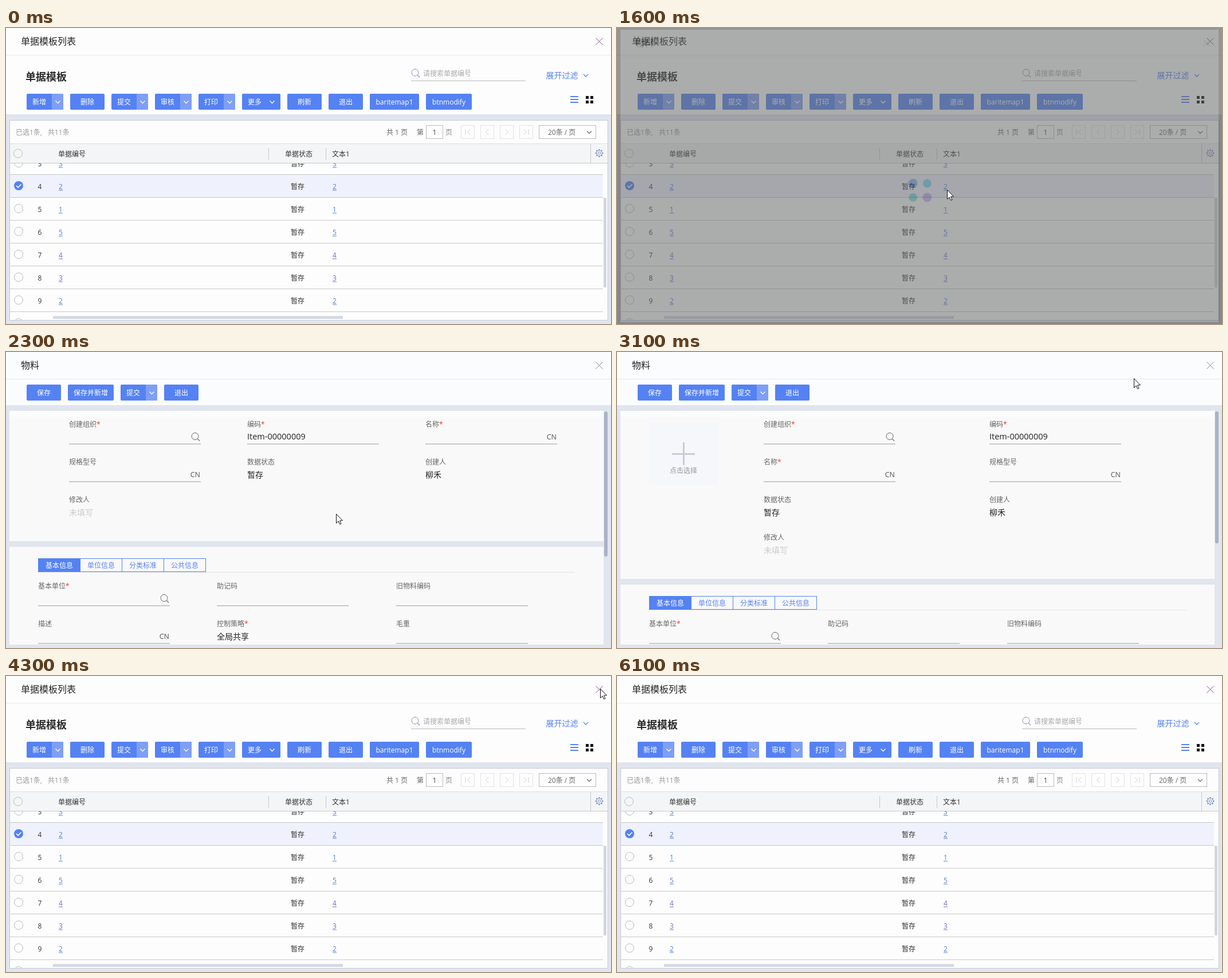
Write an HTML page with a canvas that moves like this. It is 1056 px wide and 518 px high and loops after 6400 ms.

```html
<!DOCTYPE html>
<html lang="zh-CN">
<head>
<meta charset="utf-8">
<style>
html, body { margin: 0; width: 100%; height: 100%; overflow: hidden; background: #fff; }
canvas { display: block; }
</style>
</head>
<body>
<canvas id="stage" width="1056" height="518"></canvas>
<script>
const W = 1056, H = 518, LOOP = 6400;
const FONT = '"Open Sans","Noto Sans CJK SC","Noto Sans CJK",sans-serif';
const BLUE = '#5582f3', LIGHT = '#7f9ff5', EDGE = '#e0e5ee', RULE = '#c9c9c9';
const screen = document.getElementById('stage').getContext('2d');
let g;

function layer(draw) {
  const c = document.createElement('canvas');
  c.width = W;
  c.height = H;
  g = c.getContext('2d');
  draw();
  return c;
}
function rect(x, y, w, h, color) {
  g.fillStyle = color;
  g.fillRect(x, y, w, h);
}
function round(x, y, w, h, r, color) {
  g.fillStyle = color;
  g.beginPath();
  g.roundRect(x, y, w, h, r);
  g.fill();
}
function box(x, y, w, h, color) {
  g.strokeStyle = color;
  g.lineWidth = 1;
  g.strokeRect(x + .5, y + .5, w - 1, h - 1);
}
// y is the vertical middle of the glyphs
function text(s, x, y, size = 12, color = '#333', align = 'left', weight = 400) {
  g.font = `${weight} ${size}px ${FONT}`;
  g.fillStyle = color;
  g.textAlign = align;
  g.fillText(s, x, Math.round(y + size * .37));
}
function line(pts, color, width = 1) {
  g.strokeStyle = color;
  g.lineWidth = width;
  g.beginPath();
  for (let i = 0; i < pts.length; i += 2) g.lineTo(pts[i], pts[i + 1]);
  g.stroke();
}
function ring(x, y, r, color, width = 1, from = 0, to = 7) {
  g.strokeStyle = color;
  g.lineWidth = width;
  g.beginPath();
  g.arc(x, y, r, from, to);
  g.stroke();
}
function disc(x, y, r, color) {
  g.fillStyle = color;
  g.beginPath();
  g.arc(x, y, r, 0, 7);
  g.fill();
}
function chevron(x, y, color, s = 4) {
  line([x - s, y - s / 2, x, y + s / 2, x + s, y - s / 2], color, 1.3);
}
function cross(x, y, color) {
  line([x - 6, y - 6, x + 6, y + 6], color);
  line([x - 6, y + 6, x + 6, y - 6], color);
}
function lens(x, y, color) {
  ring(x, y, 6, color);
  line([x + 4.3, y + 4.3, x + 8, y + 8], color, 1.2);
}
function button(label, x, y, w, kind) {
  round(x, y, w, 28, 2, BLUE);
  if (kind === 'split') round(x + w - 20, y, 20, 28, [0, 2, 2, 0], LIGHT);
  const mid = kind ? x + 22 : x + w / 2;
  text(label, mid, y + 14.5, 12, '#fff', 'center', 500);
  if (kind) chevron(x + w - (kind === 'split' ? 9.5 : 14.5), y + 14.5, '#fff');
}

function link(s, x, y, color) {
  text(s, x, y, 12, color);
  rect(x, y + 6, 7, 1, color);
}

function drawList() {
  rect(0, 0, W, H, '#fdfdfd');
  rect(0, 47, W, 1, '#ececec');
  text('单据模板列表', 26, 23.5, 16, '#222');
  text('单据模板', 34, 85, 18, '#2b2b2b', 'left', 700);
  lens(714, 78, '#8a94b5');
  text('请搜索单据编号', 728, 80, 12, '#aaa');
  rect(707, 92, 200, 1, '#bbb');
  text('展开过滤', 942.5, 83, 14, BLUE);
  chevron(1012, 83, BLUE);

  button('新增', 36, 115, 64, 'split');
  button('删除', 112, 115, 60);
  button('提交', 184, 115, 64, 'split');
  button('审核', 260, 115, 64, 'split');
  button('打印', 336, 115, 64, 'split');
  button('更多', 412, 115, 67, 'menu');
  button('刷新', 491, 115, 60);
  button('退出', 563, 115, 60);
  button('baritemap1', 635, 115, 86);
  button('btnmodify', 733, 115, 80);
  for (const y of [119, 124, 129]) rect(985, y, 14, 2, BLUE);
  for (const x of [1012, 1020]) for (const y of [119, 127]) rect(x, y, 5, 5, '#111');

  rect(0, 151, W, H - 151, EDGE);
  rect(6, 161, 1045, 351, '#fdfdfd');
  text('已选1条,', 17, 182.5, 12, '#999');
  text('共11条', 73, 182.5, 12, '#999');
  text('共 1 页', 664, 182.5, 12, '#666');
  text('第', 717, 182.5, 12, '#666');
  box(733, 170, 30, 24, '#bbb');
  text('1', 748, 182.5, 12, '#444', 'center');
  text('页', 767, 182.5, 12, '#888');
  for (let i = 0; i < 4; i++) {
    const x = 794 + i * 34, d = i < 2 ? 1 : -1, c = x + 12 + (i % 3 ? 0 : d * 2);
    box(x, 170, 24, 24, '#e2e2e2');
    line([c + d * 2.5, 177, c - d * 2.5, 182, c + d * 2.5, 187], '#d0d0da');
    if (i % 3 === 0) line([c - d * 6, 177, c - d * 6, 187], '#d0d0da');
  }
  box(930, 170, 100, 24, '#bbb');
  text('20条 / 页', 946, 182.5, 12, '#666');
  chevron(1018, 182.5, '#777');

  rect(7, 202, 1043, 34, '#f4f5f6');
  rect(7, 202, 1043, 1, '#dcdfe6');
  ring(21, 219.5, 7.5, '#bbb');
  text('单据编号', 91, 220.5);
  text('单据状态', 487, 220.5);
  text('文本1', 569, 220.5);
  for (const x of [458, 558]) rect(x, 210, 1, 21, '#c8c8c8');
  rect(1020, 203, 1, 33, '#c8c8c8');
  ring(1035.5, 219, 2.2, '#7c92c4');
  ring(1035.5, 219, 5, '#7c92c4');
  for (let i = 0; i < 8; i++) {
    const a = i * Math.PI / 4, c = Math.cos(a), s = Math.sin(a);
    line([1035.5 + 5 * c, 219 + 5 * s, 1035.5 + 7 * c, 219 + 7 * s], '#7c92c4', 2);
  }

  g.save();
  g.beginPath();
  g.rect(7, 236, 1043, 275);
  g.clip();
  [3, 2, 1, 5, 4, 3, 2, 1].forEach((v, i) => {
    const y = 237.5 + i * 40, on = i === 1;
    const color = v === 1 ? '#3f8ae0' : v > 2 && v < 5 && i ? '#7a68c8' : '#5580d0';
    if (on) rect(7, 257, 1035, 39, '#eff2fd');
    rect(7, y + 18.5, 1035, 1, RULE);
    if (on) {
      disc(22, 276, 8, BLUE);
      line([18, 276, 21, 279, 26.5, 273.5], '#fff', 1.6);
    } else ring(22, y - 1.5, 7.5, '#bbb');
    if (i > 6) return;
    text(String(i + 3), 59, y, 12, '#333', 'center');
    link(String(v), 92, y, color);
    text('暂存', 509, y, 12, '#333', 'center');
    link(String(v), 570, y, color);
  });
  g.restore();
  rect(7, 236, 1043, 1, RULE);
  rect(1043, 297, 5, 157, '#d3d6de');
  rect(82, 504, 506, 5, '#d5d8e0');
  box(6, 161, 1045, 351, '#c6cad3');
  cross(1035.5, 23.5, '#85568f');
}

function drawHead() {
  rect(0, 0, W, H, '#fbfcfe');
  rect(0, 47, W, 1, '#e6e8ec');
  text('物料', 26, 23.5, 16, '#222');
  cross(1035.5, 23.5, '#888');
}
function drawShell() {
  drawHead();
  button('保存', 36, 57, 60);
  button('保存并新增', 108, 57, 80);
  button('提交', 200, 57, 64, 'split');
  button('退出', 276, 57, 60);
  rect(0, 93, W, H - 93, EDGE);
}

// label, with an optional star, value or trailing icon; y is the middle of the label
function field(name, x, y, { need, code, value, plain, find, cn } = {}) {
  text(name, x, y, 12, '#666');
  if (need) text('*', x + name.length * 12, y, 12, '#f33');
  if (code) text(code, x, y + 21.5, 14.5, '#222');
  if (value) text(value, x, y + 22.5, 14, value === '未填写' ? '#ccc' : '#222');
  if (find) lens(x + 220, y + 21, '#666');
  if (cn) text('CN', x + 229, y + 21.5, 12.5, '#555', 'right');
  if (!plain) rect(x, y + 34, 230, 1, '#999');
}
function drawForm(withImage) {
  const dy = withImage ? 66 : 0;
  drawShell();
  rect(6, 103, 1037, 228 + dy, '#f9f9f9');
  rect(6, 103, 1037, 10, '#fcfdfe');
  rect(6, 341 + dy, 1037, 171 - dy, '#f9f9f9');
  round(1044, 104, 6, withImage ? 231 : 254, 3, '#aab3c6');
  const fields = [
    ['创建组织', { need: 1, find: 1 }],
    ['编码', { need: 1, code: 'Item-00000009' }],
    ['名称', { need: 1, cn: 1 }],
    ['规格型号', { cn: 1 }],
    ['数据状态', { value: '暂存', plain: 1 }],
    ['创建人', { value: '柳禾', plain: 1 }],
    ['修改人', { value: '未填写', plain: 1 }]
  ];
  const cols = withImage ? [256, 650] : [110, 421, 732], n = cols.length;
  fields.forEach(([name, opt], i) => field(name, cols[i % n], 126.5 + 66 * Math.floor(i / n), opt));
  if (withImage) {
    rect(56, 124, 120, 109, '#f6f7fa');
    rect(96, 177, 40, 3, '#c9cbd8');
    rect(115, 158, 3, 40, '#c9cbd8');
    text('点击选择', 116, 208, 12, '#999', 'center');
  }

  g.save();
  g.beginPath();
  g.rect(6, 341, 1037, 171);
  g.clip();
  g.translate(0, dy);
  rect(56, 385, 937, 1, '#e5e5e5');
  ['基本信息', '单位信息', '分类标准', '公共信息'].forEach((name, i) => {
    const x = 56 + i * 73;
    if (i) box(x, 361, 74, 24, BLUE);
    else rect(x, 361, 74, 24, BLUE);
    text(name, x + 37, 373.5, 12, i ? BLUE : '#fff', 'center');
  });
  field('基本单位', 56, 409.5, { need: 1, find: 1 });
  field('助记码', 368, 409.5);
  field('旧物料编码', 681, 409.5);
  field('描述', 56, 475.5, { cn: 1 });
  field('控制策略', 368, 475.5, { need: 1, value: '全局共享', plain: 1 });
  field('毛重', 681, 475.5);
  g.restore();
}

function shape(d, fill, stroke, width = 1) {
  const p = new Path2D(d);
  if (fill) {
    g.fillStyle = fill;
    g.fill(p);
  }
  if (stroke) {
    g.strokeStyle = stroke;
    g.lineWidth = width;
    g.stroke(p);
  }
}
function drawPopup() {
  round(299, 80, 460, 361, 5, '#f8f9fb');
  disc(328, 109, 3, '#fdb92b');
  text('业务提示', 339, 109.5, 18, '#333');
  cross(726, 109, '#4a86c4');
  const ink = '#8f9bc8';
  shape('M500 184V171Q500 166 505 166H551Q555 166 555 171.500Q555 177 551 177H509V171Q508 166 504 166', '#fff', ink, 1.2);
  shape('M509 167H551Q554 168 554 171H509Z', '#d9def0');
  shape('M500 190V200M500 205V231M548 178V189M500 232V238Q501 242 505 242H540Q546 242 549 237', null, ink, 1.2);
  shape('M490 231H500V238Q501 242 505 242H495Q490 241 490 236Z', '#d9def0', ink, 1.2);
  const gold = g.createLinearGradient(0, 196, 0, 230);
  gold.addColorStop(0, '#fff5d8');
  gold.addColorStop(1, '#ffe197');
  shape('M531 229V213Q532 197 548 196Q564 197 565 213V229Z', gold, '#f1a558', 1.3);
  round(527, 229, 42, 4, 2, '#ffc86b');
  shape('M529 229H567Q569 231 567 233H529Q527 231 529 229M543 233Q548 240 552 233', null, '#f1a558', 1.2);
  ring(548, 192.500, 3, '#f1a558', 1.2);
  for (const r of [22, 27]) {
    ring(548, 211, r, '#f1a558', 1.2, -.75, .72);
    ring(548, 211, r, '#f1a558', 1.2, Math.PI - .72, Math.PI + .75);
  }
  text('事件 billClosedCallBack，可以收到系统自动打包', 528.5, 298.5, 17.8, '#777', 'center');
  text('的子界面内码0', 528.5, 326.5, 18, '#777', 'center');
  round(469, 375, 120, 32, 2, '#fff');
  box(469, 375, 120, 32, '#bbb');
  text('我知道了', 528, 391.5, 14, '#666', 'center');
}

function drawDots(t) {
  const s = t / 100 % 2 ? .4 : 0;
  disc(516.5, 272, 8 - s, '#2885f0');
  disc(541.5, 272, 7.5 + s, '#00ccfd');
  disc(516.5, 297, 7.5 + s, '#00c8c4');
  disc(541.5, 297, 8 - s, '#a070fd');
}

const list = layer(drawList), head = layer(drawHead), shell = layer(drawShell);
const plainForm = layer(() => drawForm(false)), imageForm = layer(() => drawForm(true));
const popup = layer(drawPopup);
const loading = layer(() => { drawHead(); drawDots(0); });

const ARROW = 'M.5.5V16.500L4.200 13L6.600 18.500L9 17.500L6.600 12H11.500Z';
const HAND = 'M-1.500 1.500Q0-.5 1.500 1.500V8Q3.500 6.500 5 8.500Q7 7.500 8 9.500Q10.500 9 10.500 11.500V16Q10 19 8.500 22.500H-1.500Q-3 18.500-6 14.500Q-7.500 11.500-5 11.500Q-3.500 11.500-1.500 14Z';
// start, end, path start, bend, path end
const moves = [
  [300, 900, 762, 202, 655, 222, 592, 264],
  [900, 1200, 592, 264, 582, 275, 576, 283],
  [2500, 3100, 576, 283, 700, 90, 902, 46],
  [3100, 3800, 902, 46, 985, 32, 1037, 22],
  [4600, 5100, 1037, 22, 780, 290, 547, 391],
  [5400, 6000, 547, 391, 890, 285, 1055, 147]
];
function cursorAt(t) {
  let m = moves[0];
  for (const next of moves) if (t >= next[0]) m = next;
  const [a, b, x0, y0, x1, y1, x2, y2] = m;
  const k = Math.min(1, (t - a) / (b - a)), q = 1 - k;
  const mix = (p, c, e) => Math.round(q * q * p + 2 * q * k * c + k * k * e);
  return [mix(x0, x1, x2), mix(y0, y1, y2)];
}
function drawCursor(t) {
  if (t < 300 || t > 6000) return;
  const [x, y] = cursorAt(t);
  const hand = t >= 1000 && t < 1600 || t >= 5000 && t < 5500;
  g.save();
  g.translate(x, y);
  g.lineJoin = 'round';
  shape(hand ? HAND : ARROW, '#fff', '#111', 1);
  if (hand) line([1.5, 8, 1.5, 11], '#111');
  if (hand) line([5, 8.5, 5, 11.5], '#111');
  g.restore();
}

function overlay(img, alpha, scale = 1) {
  g.save();
  g.globalAlpha = alpha;
  g.translate(W / 2, H / 2);
  g.scale(scale, scale);
  g.drawImage(img, -W / 2, -H / 2);
  g.restore();
}
function shade(alpha) {
  rect(0, 0, W, H, `rgba(0,0,0,${alpha})`);
}

function render(t) {
  g = screen;
  g.drawImage(list, 0, 0);
  if (t >= 1600 && t < 4300) {
    if (t < 1700) {
      shade(.41);
      overlay(loading, .22, .988);
    } else if (t < 1800) {
      shade(.4);
      overlay(loading, .85, .998);
    } else if (t < 2100) {
      g.drawImage(head, 0, 0);
      drawDots(t);
    } else if (t < 2300) g.drawImage(shell, 0, 0);
    else if (t < 2500) g.drawImage(plainForm, 0, 0);
    else if (t < 4200) g.drawImage(imageForm, 0, 0);
    else {
      shade(.2);
      overlay(imageForm, .5, .99);
    }
  }
  if (t >= 3700 && t < 4200) cross(1035.5, 23.5, '#8583f5');
  if (t >= 4500 && t < 5600) {
    const k = t < 4600 || t >= 5500 ? .45 : 1;
    shade(.37 * k);
    overlay(popup, k, .97 + .03 * k);
  }
  drawCursor(t);
}

const start = performance.now();
function tick() {
  const t = (performance.now() - start) % LOOP;
  render(Math.floor(t / 100) * 100);
  requestAnimationFrame(tick);
}
tick();
</script>
</body>
</html>
```
